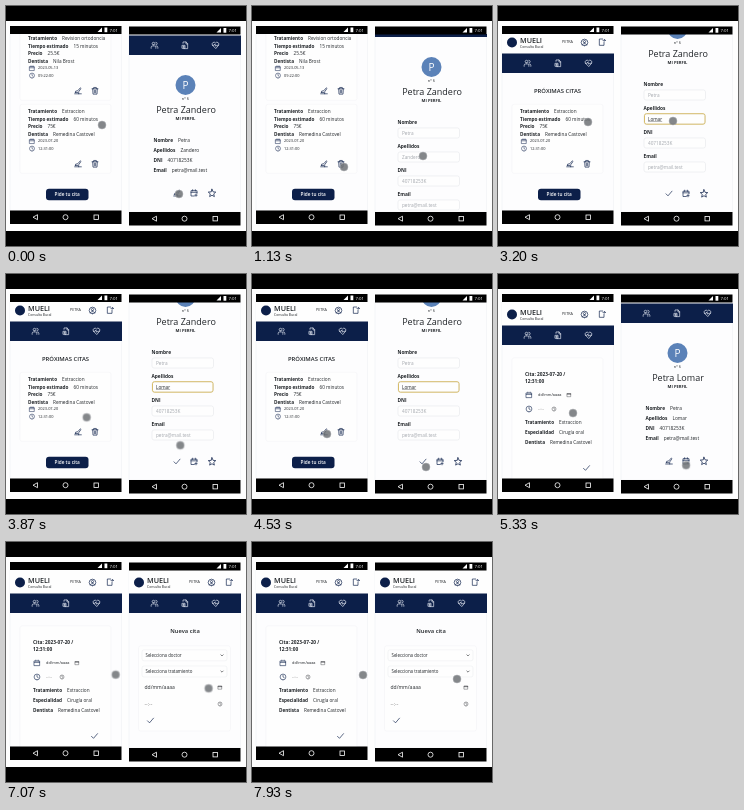
Recreate the animation shown at these times as an HTML page. Size 240 by 240 pixels, loop 8 s.

```html
<!DOCTYPE html>
<html lang="es">
<head>
<meta charset="utf-8">
<title>Citas</title>
<style>
  html, body { margin: 0; width: 100%; height: 100%; overflow: hidden; background: #fff; }
  svg { display: block; width: 100vw; height: 100vh; font-family: "Open Sans", "Noto Sans", sans-serif; }
  .anim { animation: 8000ms infinite both; }
</style>
</head>
<body>
<script>
const LOOP = 8000, NAVY = '#0c1f49', INK = '#212529', PALE = '#f3f4f6';
let css = '', count = 0;

const percent = ms => (ms / LOOP * 100).toFixed(3) + '%';

function animated(frames, timing, content) {
  const name = 'k' + count++;
  css += `@keyframes ${name}{${frames}}`;
  return `<g class="anim" style="animation-name:${name};animation-timing-function:${timing}">${content}</g>`;
}

// Shows content only between two moments of the loop.
function during(from, to, content) {
  const start = from > 0 ? '0%{opacity:0}' : '';
  const end = to < LOOP ? `${percent(to)},100%{opacity:0}` : '100%{opacity:1}';
  return animated(`${start}${percent(from)}{opacity:1}${end}`, 'step-end', content);
}

// Moves content through [ms, x, y] stops; the last one is held.
function along(stops, content) {
  const last = stops[stops.length - 1];
  const frames = [...stops, [LOOP, last[1], last[2]]]
    .map(([ms, x, y]) => `${percent(ms)}{transform:translate(${x}px,${y}px)}`).join('');
  return animated(frames, 'ease-in-out', content);
}

function text(x, y, size, str, { weight = 400, fill = INK, anchor = 'start', extra = '' } = {}) {
  return `<text x="${x}" y="${y + size * .36}" font-size="${size}" font-weight="${weight}" fill="${fill}" text-anchor="${anchor}" ${extra}>${str}</text>`;
}

const box = (x, y, w, h, fill, extra = '') =>
  `<rect x="${x}" y="${y}" width="${w}" height="${h}" fill="${fill}" ${extra}/>`;

const outlined = (x, y, w, h, stroke, fill = '#fefefe') =>
  box(x, y, w, h, fill, `rx="2" stroke="${stroke}" stroke-width=".6"`);

const pair = (x, y, label, value, size = 4.7) =>
  text(x, y, size, `${label}<tspan dx="5" font-weight="400">${value}</tspan>`, { weight: 700 });

// Icon outlines on a 24 unit grid.
const icons = {
  users: 'M9 11a4 4 0 1 0 0-8a4 4 0 0 0 0 8M2 21v-3a4 4 0 0 1 4-4h6a4 4 0 0 1 4 4v3M16 3a4 4 0 0 1 0 8M18 14a4 4 0 0 1 4 4v3',
  file: 'M6 6V2h9l5 5v15H8M15 2v6h5M4 12h8v9H4zM8 14v5M6 16.500h4',
  heart: 'M12 21L3 12a5.500 5.500 0 0 1 9-7a5.500 5.500 0 0 1 9 7zM3 12h5l2-4l3 7l2-3h6',
  user: 'M12 22a10 10 0 1 0 0-20a10 10 0 0 0 0 20M12 13a3.500 3.500 0 1 0 0-7a3.500 3.500 0 0 0 0 7M5 19c2-5 12-5 14 0',
  exit: 'M14 3H4v19h14V13M15 7h7M19 4l3 3l-3 3',
  edit: 'M2 21h20M4 17l1-4l6-1l8-9l2 2l-7 10v6M4 17h7',
  trash: 'M3 6h18M8 6V2h8v4M5 6l1 16h12l1-16M10 10v8M14 10v8',
  calendar: 'M3 5h18v16H3zM3 10h18M8 2v4M16 2v4',
  calendarPlus: 'M13 21H3V5h18v8M3 10h18M8 2v4M16 2v4M18 15v7M14.500 18.500h7',
  picker: 'M3 4h18v17H3zM3 6h18M3 8h18',
  clock: 'M12 22a10 10 0 1 0 0-20a10 10 0 0 0 0 20M12 6v6l4 2',
  check: 'M3 13l6 6L21 5',
  star: 'M12 2l3 7l7 .6l-5.400 4.800l1.700 7.200L12 18l-6.300 3.600l1.700-7.200L2 9.600L9 9z',
  down: 'M5 9l7 7l7-7'
};

const icon = (name, x, y, size = 8, color = NAVY, width = 2) =>
  `<path d="${icons[name]}" transform="translate(${x - size / 2} ${y - size / 2}) scale(${size / 24})" fill="none" stroke="${color}" stroke-width="${width}" stroke-linecap="round" stroke-linejoin="round"/>`;

const header = () =>
  box(3, 28, 113, 24, '#fefefe') +
  `<circle cx="14" cy="40.500" r="5" fill="${NAVY}"/>` +
  text(22, 38.5, 7.2, 'MUELI', { weight: 600 }) +
  text(22, 44.5, 3.4, 'Consulta Bucal') +
  text(64, 40, 3.7, 'PETRA') +
  icon('user', 86.5, 40.5) + icon('exit', 104, 40) +
  box(3, 51.5, 113, 19.5, NAVY) +
  ['users', 'file', 'heart'].map((name, i) => icon(name, 29.5 + 30.5 * i, 61.3, 8, '#e8edf6')).join('');

function appointment(y, { treatment, minutes, price, dentist, date, time }) {
  return outlined(14, y - 7, 91, 69, PALE) +
    pair(22, y, 'Tratamiento', treatment) +
    pair(22, y + 8, 'Tiempo estimado', minutes + ' minutos') +
    pair(22, y + 15.5, 'Precio', price + '€') +
    pair(22, y + 23, 'Dentista', dentist) +
    icon('calendar', 26, y + 30, 6) + text(32, y + 29.7, 3.9, date) +
    icon('clock', 26, y + 37.3, 6) + text(32, y + 37.3, 3.9, time) +
    icon('edit', 72, y + 52.5) + icon('trash', 89, y + 52.5);
}

const bookButton = y => box(40, y - 5.7, 42.5, 11.5, NAVY, 'rx="3"') +
  text(61.2, y, 4.7, 'Pide tu cita', { weight: 600, fill: '#fff', anchor: 'middle' });

const checkup = { treatment: 'Revision ortodoncia', minutes: 15, price: 25.5, dentist: 'Nila Brost', date: '2023-05-13', time: '09:22:00' };
const extraction = { treatment: 'Extraccion', minutes: 60, price: 75, dentist: 'Remedina Castovel', date: '2023-07-20', time: '12:31:00' };

const listPage = items => header() +
  text(59.5, 88.5, 5.9, 'PRÓXIMAS CITAS', { weight: 600, anchor: 'middle' }) +
  items.map((item, i) => appointment(109.3 + 73 * i, item)).join('') +
  bookButton(119.5 + 73 * items.length);

const dateField = (x, y, end, size) => text(x, y, size, 'dd/mm/aaaa') + icon('picker', end, y, 4.5, INK);
const timeField = (x, y, end, size) => text(x, y, size, '--:--', { fill: '#777' }) + icon('clock', end, y, 4.8, INK);

const changePage = () => header() + outlined(14, 84, 91, 130, PALE) +
  text(27, 100, 4.8, 'Cita: 2023-07-20 /', { weight: 700 }) +
  text(27, 107.3, 4.8, '12:31:00', { weight: 700 }) +
  icon('calendar', 31, 121, 7) + dateField(40, 121, 71, 3.9) +
  icon('clock', 31, 135, 7) + timeField(40, 135, 56, 3.9) +
  pair(27, 148, 'Tratamiento', 'Extraccion') +
  pair(27, 158, 'Especialidad', 'Cirugía oral') +
  pair(27, 168, 'Dentista', 'Remedina Castovel') +
  icon('check', 88.5, 194);

const profileTop = surname => header() +
  '<circle cx="60.500" cy="101" r="10" fill="#5b82b8"/>' +
  text(60.5, 101, 10, 'P', { fill: '#fff', anchor: 'middle' }) +
  text(60.5, 115, 4, 'nº 6', { anchor: 'middle' }) +
  text(61, 125.5, 9, 'Petra ' + surname, { anchor: 'middle' }) +
  text(60.5, 134.3, 4.1, 'MI PERFIL', { weight: 700, anchor: 'middle' });

const profileIcons = (first, y) => icon(first, 52, y) + icon('calendarPlus', 69, y) + icon('star', 87, y, 9);

const profilePage = surname => profileTop(surname) +
  [['Nombre', 'Petra'], ['Apellidos', surname], ['DNI', '40718253K'], ['Email', 'petra@mail.test']]
    .map(([label, value], i) => pair(28.5, 156 + 10 * i, label, value, 4.8)).join('') +
  profileIcons('edit', 209);

const input = (y, value) => outlined(27, y - 5, 61.5, 10, '#e6e8eb') +
  text(31, y, 4.7, value, { fill: '#a3a7ad' });

function typed(word, x, y, start, step) {
  return [...word].map((_, i) => during(start + step * i, i < word.length - 1 ? start + step * (i + 1) : LOOP,
    text(x, y, 4.7, word.slice(0, i + 1), { extra: 'text-decoration="underline"' }))).join('');
}

const formPage = () => profileTop('Zandero') +
  [['Nombre', 'Petra'], ['Apellidos', ''], ['DNI', '40718253K'], ['Email', 'petra@mail.test']]
    .map(([label, value], i) => text(26.5, 156 + 24 * i, 4.8, label, { weight: 700 }) + input(167 + 24 * i, value)).join('') +
  during(1920, LOOP, box(27.5, 185.7, 60.5, 10.5, 'none', 'rx="2" stroke="#d3b65c" stroke-width=".9"')) +
  during(0, 2560, text(31, 191, 4.7, 'Zandero', { fill: '#a3a7ad' })) +
  typed('Lomar', 31, 191, 2560, 120) +
  profileIcons('check', 265.5);

const select = (y, label) => outlined(17, y - 5.5, 85, 11, '#eceef0') +
  text(20.5, y, 4.4, label) + icon('down', 97, y, 4, INK, 3.5);

const bookingPage = () => header() +
  text(60, 89.3, 5.8, 'Nueva cita', { weight: 600, anchor: 'middle' }) +
  outlined(13.5, 104, 92, 85, PALE) +
  select(113.3, 'Selecciona doctor') + select(129.5, 'Selecciona tratamiento') +
  dateField(19.5, 145.5, 95, 5) + timeField(19.5, 162, 95, 5) +
  icon('check', 25.5, 178.5);

const scrolled = (y, content) => `<g transform="translate(0 ${-y})">${content}</g>`;

function phone(x, top, navTop, content) {
  const id = 'screen' + x;
  return `<g transform="translate(${x} 0)">
    <clipPath id="${id}">${box(4, 28, 111.5, navTop - 28, '#fff')}</clipPath>
    ${box(4, 28, 111.5, navTop - 28, '#fdfdfe', 'stroke="#eceef1" stroke-width=".5"')}
    <g clip-path="url(#${id})">${content}</g>
    <g transform="translate(0 ${top})">
      ${box(4, 0, 111.5, 8, '#000')}
      <path d="M91.500 6h4.500v-4.500z" fill="#fff"/>${box(98.5, 1.5, 2.8, 4.7, '#fff')}
      ${text(103.5, 4.1, 4.3, '7:01', { fill: '#fff' })}
    </g>
    ${box(4, navTop, 111.5, 13.5, '#000')}
    <g transform="translate(0 ${navTop + 6.7})" fill="none" stroke="#fff" stroke-width=".8">
      <path d="M31.500-2.500v5l-4.500-2.500z"/><circle cx="59.500" r="2.500"/><rect x="88" y="-2.200" width="4.400" height="4.400"/>
    </g></g>`;
}

const pointer = stops => along(stops, '<circle r="4" fill="#6f7276" fill-opacity=".85" stroke="#b5b7ba" stroke-width=".5"/>');

const leftScreen =
  during(0, 2500, along([[0, 0, -77], [1250, 0, -77], [1750, 0, -46]], listPage([checkup, extraction]))) +
  during(2500, 4850, scrolled(4, listPage([extraction]))) +
  during(4850, LOOP, changePage());

const rightScreen =
  during(0, 360, scrolled(22, profilePage('Zandero'))) +
  during(360, 4800, along([[0, 0, -22], [500, 0, -22], [900, 0, -40], [1350, 0, -40], [1750, 0, -78]], formPage())) +
  during(4800, 5700, scrolled(22, profilePage('Lomar'))) +
  during(5700, LOOP, bookingPage());

const scene = box(0, 0, 240, 240, '#000') + box(0, 15, 240, 210, '#fefefe') +
  phone(0, 20, 204.5, leftScreen) + phone(119, 20.5, 206, rightScreen) +
  pointer([[0, 96, 119], [400, 96, 119], [1000, 92, 161], [1300, 92, 161], [1900, 89, 115], [3300, 90, 116],
    [4300, 75, 160], [4900, 75, 160], [5700, 75, 123], [6250, 75, 123], [7200, 111, 133]]) +
  pointer([[0, 173, 188], [500, 173, 188], [1050, 171, 150], [1350, 171, 150], [1900, 175, 115], [3300, 175, 115],
    [4200, 174, 193], [4800, 174, 193], [5500, 190, 191], [6250, 191, 192], [7400, 205, 137]]);

document.body.innerHTML = `<style>${css}</style><svg viewBox="0 0 240 240">${scene}</svg>`;
</script>
</body>
</html>
```
